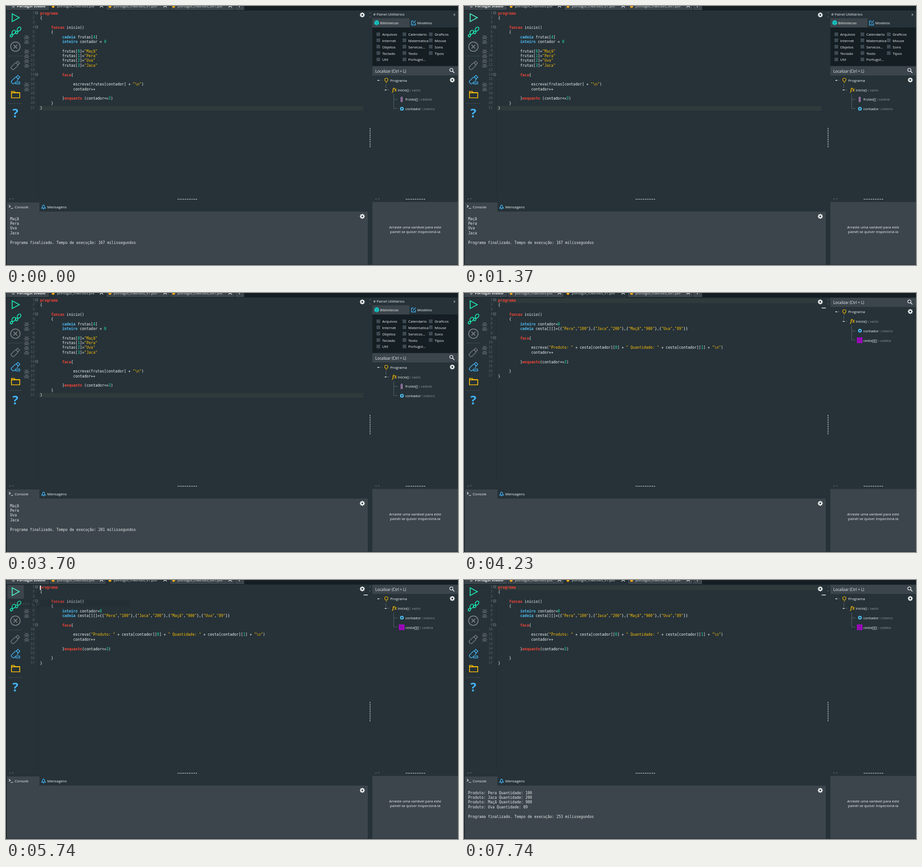
Recreate the animation shown at these times as an HTML page with a canvas. Size 987 px wide and 567 px high, loop 8 s.

```html
<!DOCTYPE html>
<html lang="pt">
<head>
<meta charset="utf-8">
<style>
html, body { margin: 0; width: 100%; height: 100%; overflow: hidden; background: #263238 }
canvas { display: block }
</style>
</head>
<body>
<canvas id="stage" width="987" height="567"></canvas>
<script>
const ctx = document.getElementById('stage').getContext('2d');
const LOOP = 8000, SWITCH = 4230, ROW = 10.37;
const BG = '#263238', PANEL = '#3b454b', DARK = '#141e23', WHITE = '#f3f6f7';
const GREEN = '#1de9b6', BLUE = '#42b3f5', AMBER = '#ffc107', RED = '#f44336';
const GREY = '#777b7d', DIM = '#8b9499', PURPLE = '#ce93d8';
const UI = '8px "Open Sans", sans-serif';
const MONO = '8px "DejaVu Sans Mono", monospace';

const documents = [
  {
    code: String.raw`programa
{

	funcao inicio()
	{
		cadeia frutas[4]
		inteiro contador = 0

		frutas[0]="Maçã"
		frutas[1]="Pera"
		frutas[2]="Uva"
		frutas[3]="Jaca"

		faca{

			escreva(frutas[contador] + "\n")
			contador++

		}enquanto (contador<=3)
	}
}`.split('\n'),
    folds: [1, 4, 14], bugs: [6, 7, 9, 10, 11, 12, 16, 17], current: 21, caretX: 79,
    output: ['Maçã', 'Pera', 'Uva', 'Jaca'],
    variables: [['list', 'frutas[]', 'cadeia'], ['ring', 'contador', 'inteiro']]
  },
  {
    code: String.raw`programa
{

	funcao inicio()
	{
		inteiro contador=0
		cadeia cesta[][]={{"Pera","100"},{"Jaca","200"},{"Maçã","900"},{"Uva","89"}}

		faca{

			escreva("Produto: " + cesta[contador][0] + " Quantidade: " + cesta[contador][1] + "\n")
			contador++

		}enquanto(contador<=3)

	}
}`.split('\n'),
    folds: [1, 4, 9], bugs: [6, 7, 11, 12], current: 1, caretX: 74,
    output: [['Pera', 100], ['Jaca', 200], ['Maçã', 900], ['Uva', 89]]
      .map(([name, count]) => `Produto: ${name} Quantidade: ${count}`),
    variables: [['ring', 'contador', 'inteiro'], ['grid', 'cesta[][]', 'cadeia']]
  }
];

function rect(x, y, w, h, color) {
  ctx.fillStyle = color;
  ctx.fillRect(x, y, w, h);
}

function text(str, x, y, color = WHITE, font = UI, align = 'left') {
  ctx.font = font;
  ctx.fillStyle = color;
  ctx.textAlign = align;
  ctx.fillText(str, x, y);
  return x + ctx.measureText(str).width;
}

function stroke(path, color, width = 1) {
  ctx.strokeStyle = color;
  ctx.lineWidth = width;
  ctx.stroke(new Path2D(path));
}

function disc(x, y, r, color) {
  ctx.fillStyle = color;
  ctx.beginPath();
  ctx.arc(x, y, r, 0, 7);
  ctx.fill();
}

function ring(x, y, r, color, width, ry = r) {
  ctx.strokeStyle = color;
  ctx.lineWidth = width;
  ctx.beginPath();
  ctx.ellipse(x, y, r, ry, 0, 0, 7);
  ctx.stroke();
}

function placed(x, y, angle, draw) {
  ctx.save();
  ctx.translate(x, y);
  ctx.rotate(angle);
  draw();
  ctx.restore();
}

function dots(x, y, dx, dy) {
  for (let i = 0; i < 11; i++) rect(x + i * dx, y + i * dy, 2, 2, '#b4bdc1');
}

function gear(x, y) {
  ring(x, y, 3, WHITE, 2.2);
  for (let i = 0; i < 8; i++)
    placed(x, y, i * Math.PI / 4, () => rect(-1.1, -5.4, 2.2, 2.2, WHITE));
}

function footprint(x, y, color) {
  placed(x, y, 0.6, () => {
    ring(0, -3, 3.4, color, 1.8, 4.9);
    ring(0, 6, 2.4, color, 1.8, 2.9);
  });
}

function usbStick(x, y, color) {
  placed(x, y, Math.PI / 4, () => {
    ctx.strokeStyle = color;
    ctx.lineWidth = 1.5;
    ctx.beginPath();
    ctx.roundRect(-4, -5, 8, 16, 3);
    ctx.rect(-3, -10, 6, 5);
    ctx.stroke();
  });
}

function bug(x, y) {
  ring(x, y + 1, 2.6, GREY, 0.9, 3.4);
  stroke(`M${x} ${y - 2}v6M${x - 2} ${y - 2}l-2-2M${x + 2} ${y - 2}l2-2M${x - 3} ${y + 1}h-3M${x + 3} ${y + 1}h3` +
    `M${x - 2} ${y + 3}l-3 2M${x + 2} ${y + 3}l3 2`, GREY, 0.9);
}

function drawTabs(active) {
  rect(0, 0, 987, 10, DARK);
  const tabs = [[95, 123, 'portugol_matrizes.por'], [219, 138, 'portugol_matrizes_v1.por'], [358, 141, 'portugol_matrizes_ex1.por']];
  rect(1, 0, 93, 9, PANEL);
  disc(16, 1, 3, '#7b8488');
  text('Portugol Studio', 24, 3, WHITE, 'bold ' + UI);
  tabs.forEach(([x, w, name], i) => {
    rect(x, 0, w, i === active ? 10 : 9, i === active ? BG : PANEL);
    disc(x + 8, 1, 3, '#f5a615');
    text(name, x + 16.5, 2.7, '#dfe4e6');
    stroke(`M${x + w - 13} -4l7 7m0-7l-7 7`, WHITE, 1.2);
  });
  rect(500, 0, 20, 9, PANEL);
  rect(509, 0, 1, 3, WHITE);
}

function drawToolbar(running, hover, bright) {
  if (hover) rect(3, 11, 36, 30, PANEL);
  const go = running ? '#8c9092' : GREEN;
  stroke('M13.5 17V34L29 25.5Z', bright && !running ? '#4ff0ca' : go, 1.9);
  footprint(15.2, 60, go);
  footprint(26.8, 53, go);
  const stop = running ? RED : GREY;
  ring(20.5, 89, 10.3, stop, 2);
  stroke('M16.5 85l8 8m0-8l-8 8', stop, 2);
  rect(4, 109, 32, 1, '#3d494f');
  usbStick(20.5, 130, GREY);
  usbStick(21, 161, BLUE);
  rect(20, 164, 12, 8, BG);
  stroke('M21 170.5v-4h9v4z', BLUE, 1.3);
  stroke('M12 187h6l2 2.5h10V201H12Z', AMBER, 1.7);
  rect(12, 189, 18, 2, AMBER);
  rect(4, 213, 32, 1, '#3d494f');
  text('?', 20.5, 244, BLUE, 'bold 27px "Open Sans", sans-serif', 'center');
}

const TOKEN = /"[^"]*"|[\wçã]+|[^"\wçã]+/g;
function tokenStyle(token) {
  if (token[0] === '"') return [AMBER, MONO];
  if (/^(programa|funcao|faca|enquanto)$/.test(token)) return [RED, 'bold ' + MONO];
  if (/^(cadeia|inteiro)$/.test(token)) return ['#4fbdf5', 'bold ' + MONO];
  if (/^\d+$/.test(token)) return [GREEN, MONO];
  return [WHITE, MONO];
}

function drawEditor(doc, caret, highlight, foldRange) {
  const top = line => 11.7 + (line - 1) * ROW;
  const currentY = Math.round(top(doc.current));
  rect(70, 10, 1, 406, '#202b30');
  if (highlight) rect(71, currentY, 709, 10, '#2f3a3c');
  doc.code.forEach((line, i) => {
    const y = top(i + 1), indent = line.lastIndexOf('\t') + 1;
    text(i + 1, 62.5, y + 5.4, '#5a686f', '7.5px "DejaVu Sans Mono", monospace', 'right');
    let x = 74.5 + indent * 24.1;
    for (const token of line.slice(indent).match(TOKEN) || []) x = text(token, x, y + 7, ...tokenStyle(token));
  });
  for (const line of doc.folds) {
    const y = Math.round(top(line)) + .5;
    stroke(`M64.5 ${y}h5v5h-5zM65.5 ${y + 2.5}h3`, '#768187', 0.8);
  }
  doc.bugs.forEach(line => bug(45, top(line) + 4));
  if (foldRange) stroke('M66.5 49V213.5H70', '#768187');
  if (caret) rect(doc.caretX, currentY, 2, 10, WHITE);
  gear(778, 19.5);
}

function drawConsole(lines) {
  rect(2, 430, 71, 21, PANEL);
  rect(2, 450, 788, 116, PANEL);
  stroke('M6.5 436l3 2.5-3 2.5M10.5 443h5', WHITE, 1.2);
  text('Console', 19, 442.6);
  stroke('M78 442.5q2-2 2-5q2-3.5 4 0q0 3 2 5zM81 444.5h2', BLUE, 1.4);
  text('Mensagens', 90, 442.6);
  gear(778, 460.5);
  lines.forEach((line, i) => text(line, 9, 468.7 + i * ROW, '#e8ecee', MONO));
}

function drawLibraries() {
  text('# Painel Utilitários', 802, 20.5);
  text('x', 977, 20.5);
  rect(800, 47, 187, 84, DARK);
  rect(800, 27, 81, 20, PANEL);
  ctx.fillStyle = '#19c8c4';
  ctx.fill(new Path2D('M809.5 31l5 2.5v6l-5 3-5-3v-6z'));
  stroke('M805 34l4.5 2.3 4.5-2.3M809.5 36.3V42', '#0c8590');
  text('Bibliotecas', 817, 40);
  stroke('M890 33h-4.5v8.5h8.5V37M889 38l5.5-6', BLUE, 1.4);
  text('Modelos', 898, 40);
  const columns = [
    [809, 'Arquivos Internet Objetos Teclado Util'],
    [866, 'Calendario Matematica Servicos... Texto Portugol...'],
    [923.5, 'Graficos Mouse Sons Tipos']
  ];
  for (const [x, names] of columns)
    names.split(' ').forEach((name, i) => {
      const y = 61.5 + i * 13.9;
      rect(x, Math.round(y - 4), 8, 8, '#3d4a51');
      text(name, x + 12.5, y + 3.3);
    });
}

function drawVariable([icon, name, type], y) {
  if (icon === 'ring') ring(864.5, y, 2.9, '#4fc3f7', 2.3);
  if (icon === 'list') {
    rect(862, y - 5, 4, 11, PURPLE);
    for (let i = 0; i < 3; i++) rect(863, y - 4 + i * 3.4, 2, 2, BG);
  }
  if (icon === 'grid') {
    rect(858, y - 6, 12, 12, '#c800ee');
    for (let i = 1; i < 4; i++) stroke(`M${858 + i * 3} ${y - 6}v12M858 ${y - 6 + i * 3}h12`, '#5d1670', 0.8);
  }
  text(type, text(name + ' : ', 872, y + 3), y + 3, DIM);
}

function drawTree(doc, shift) {
  ctx.save();
  ctx.translate(0, shift);
  rect(800, 132, 187, 20, PANEL);
  text('Localizar (Ctrl + L)', 806.5, 145.5, WHITE, '8.2px "Open Sans", sans-serif');
  ring(972.5, 140, 3.4, WHITE, 1.4);
  stroke('M975 142.5l4 4', WHITE, 1.7);
  gear(974.5, 162);
  rect(811, 162, 4, 1.5, WHITE);
  rect(827, 183, 4, 1.5, WHITE);
  stroke('M816 162.5h4M829.5 171v9M832 183.5h5M846.5 193v31.5h8M846.5 204.5h8', '#56646b');
  stroke('M828.5 165q-1.5-2-1.5-4q0-3 3.5-3t3.5 3q0 2-1.5 4zM829 167.5h3', AMBER, 1.2);
  text('Programa', 839, 165.5);
  text('fx', 843.5, 186.5, AMBER, 'italic bold 10px "Noto Serif", serif');
  text('vazio', text('inicio() : ', 855.5, 186.5), 186.5, DIM);
  drawVariable(doc.variables[0], 204);
  drawVariable(doc.variables[1], 225);
  ctx.restore();
}

function drawSplitters() {
  dots(794, 267, 0, 4);
  dots(375, 422, 4, 0);
  dots(873, 422, 4, 0);
  ctx.fillStyle = '#59666c';
  ctx.fill(new Path2D('M796 13v4l-2-2zM794 22v4l2-2z'));
  for (const x of [7, 806]) ctx.fill(new Path2D(`M${x} 423.5h4l-2-2.5zM${x + 6} 421h4l-2 2.5z`));
  rect(800, 429, 187, 137, PANEL);
  text('Arraste uma variável para este', 893.5, 486.5, WHITE, UI, 'center');
  text('painél se quiser inspecioná-la', 893.5, 497, WHITE, UI, 'center');
}

function faded(alpha, draw) {
  if (!alpha) return;
  ctx.save();
  ctx.globalAlpha = alpha;
  draw();
  ctx.restore();
}

function pauseTip() {
  rect(928, 548, 33, 19, '#dfe1e2');
  text('Pausar', 944.5, 561.5, '#30383c', UI, 'center');
}

function runTip() {
  rect(6, 44, 267, 16, DARK);
  ctx.beginPath();
  ctx.rect(6, 44, 69, 16);
  ctx.clip();
  disc(10.5, 51, 3, RED);
  text('Executa o programa', 17, 54.5, WHITE, MONO);
}

// Value of the last [start, value] step that has begun.
const stepAt = (t, steps) => steps.reduce((value, [start, next]) => t >= start ? next : value, 0);
const during = (t, ...spans) => spans.some(([from, to]) => t >= from && t < to);

function consoleLines(t, output) {
  const count = stepAt(t, [[0, 4], [1720, 0], [1870, 2], [1930, 4], [SWITCH, 0], [5780, 4]]);
  const elapsed = stepAt(t, [[0, 167], [1720, 0], [2260, 201], [SWITCH, 0], [6170, 253]]);
  const end = elapsed ? ['', `Programa finalizado. Tempo de execução: ${elapsed} milissegundos`] : [];
  return [...output.slice(0, count), ...end];
}

function render(t) {
  const second = t >= SWITCH, doc = documents[+second];
  rect(0, 0, 987, 567, BG);
  drawTabs(+second);
  drawToolbar(
    during(t, [1720, 2260], [5780, 6170]),
    during(t, [1640, 1720], [2330, 2660], [5250, 5780], [6240, 7490]),
    during(t, [1370, 1430], [1500, 1720], [2330, 2660], [4980, 5780], [6240, 7490])
  );
  drawEditor(doc,
    during(t, [2200, 2660], [3170, 3700], [4300, 4790], [5320, 5780], [6240, 6690], [7230, 7740]),
    !during(t, [5250, 5780]),
    during(t, [860, 930]));
  drawConsole(consoleLines(t, doc.output));
  if (second) rect(781, 32, 9, 1.5, WHITE);
  else drawLibraries();
  drawTree(doc, second ? -121.5 : 0);
  drawSplitters();
  rect(0, 10, 1, 557, DARK);
  rect(0, 566, 987, 1, '#263035');
  faded(stepAt(t, [[370, .4], [440, .8], [510, 1], [580, .5], [640, 0]]), pauseTip);
  faded(stepAt(t, [[5250, .1], [5320, .2], [5390, .3], [5450, .4], [5520, .35], [5620, .25], [5740, .15], [5780, 0]]), runTip);
}

function frame() {
  render(performance.now() % LOOP);
  requestAnimationFrame(frame);
}
frame();
</script>
</body>
</html>
```
